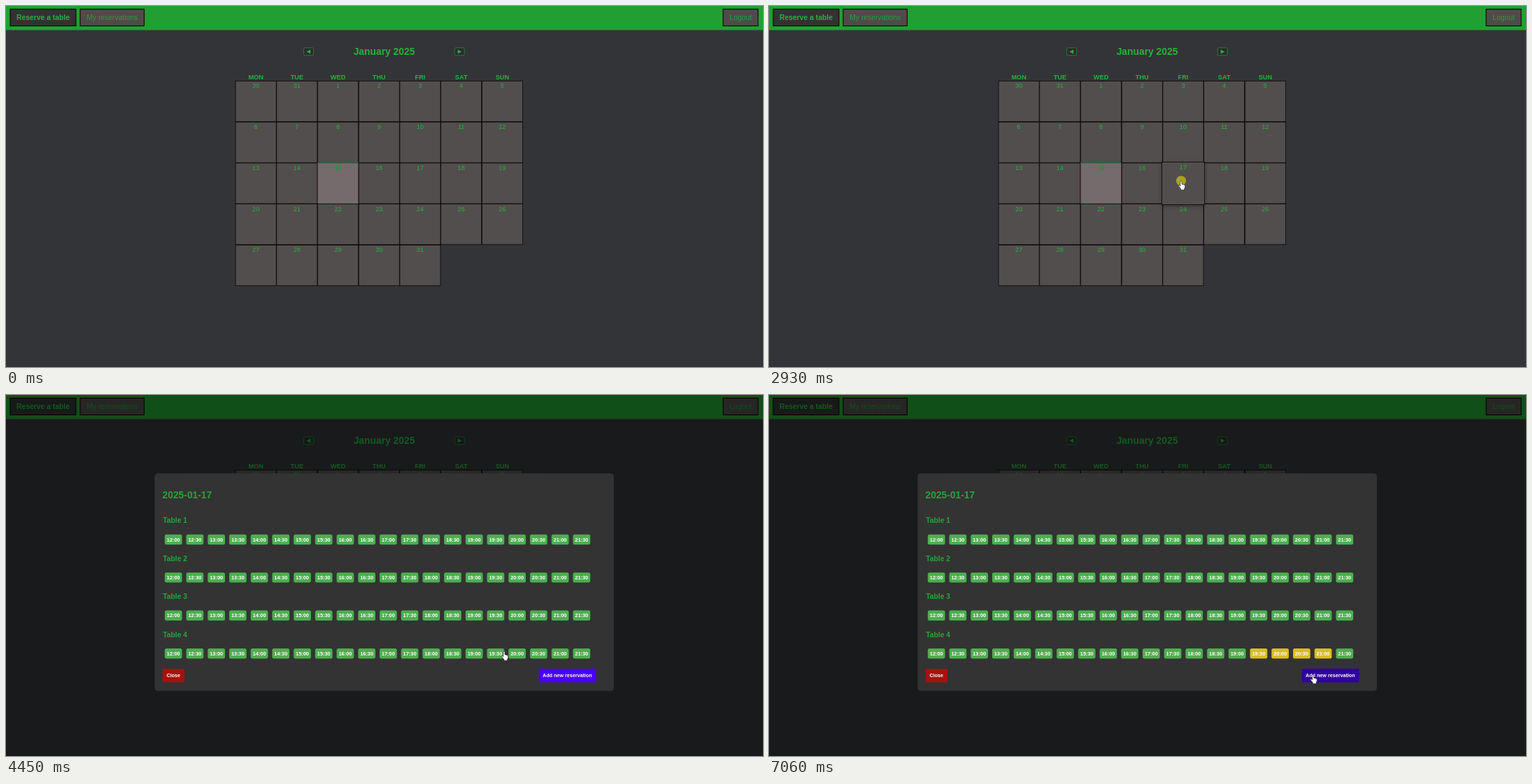
Animation of 1082 by 517 pixels, one loop 8000 ms. Source, as an HTML page:

```html
<!DOCTYPE html>
<html lang="en">
<head>
<meta charset="utf-8">
<title>Table reservations</title>
<style>
html, body { margin: 0; width: 100%; height: 100%; overflow: hidden; background: #333437; }
svg { display: block; width: 1082px; height: 517px; font-family: "Liberation Sans", Arial, sans-serif; }
text { text-anchor: middle; }
.bold { font-weight: bold; }
.start { text-anchor: start; }
</style>
</head>
<body>
<svg id="stage" viewBox="0 0 1082 517"></svg>
<script>
const LOOP = 8000;
const GREEN = '#28b13f';
const CELL = 58.7, LEFT = 327.8, TOP = 107.2;
const SLOT_X = 226.9, SLOT_STEP = 30.71, SLOT_W = 24.7, SLOT_H = 14.4, ROW_STEP = 54.4;
const MODAL_TOP = 112.2;

const range = n => [...Array(n).keys()];
const rect = (x, y, w, h, fill, more = '') =>
  `<rect x="${x}" y="${y}" width="${w}" height="${h}" fill="${fill}" ${more}/>`;
const text = (x, y, size, fill, str, cls = '') =>
  `<text x="${x}" y="${y}" font-size="${size}" fill="${fill}" class="${cls}">${str}</text>`;

const border = 'stroke="#0b0506" stroke-width="1.1"';
const navButton = (x, w, label, fill, color, cls) =>
  rect(x, 4.5, w, 24, fill, border) + text(x + w / 2, 20, 10.35, color, label, cls);

const arrowButton = (x, dir) =>
  rect(x, 59.8, 14, 11, '#2b2c2e', 'rx="2" stroke="#1f9136" stroke-width=".8"') +
  `<path d="M${x + 7 + 3 * dir} 65.6l${-5.6 * dir} -3v6z" fill="${GREEN}"/>`;

const cells = range(33).map(i => ({
  x: LEFT + i % 7 * CELL,
  y: TOP + Math.floor(i / 7) * CELL,
  day: (i + 29) % 31 + 1,
  today: i === 16
}));

function cellMarkup({ x, y, day, today }) {
  const edge = today
    ? `<path d="M${x} ${y + .3}h${CELL}M${x} ${y + CELL - .3}h${CELL}" stroke="#1f9a48" stroke-width=".9"/>`
    : '';
  const body = rect(x + .3, y + .3, CELL - .6, CELL - .6, today ? '#756b6c' : '#524e4d',
    `stroke="${today ? '#4a2c30' : '#050001'}" stroke-width=".7"`);
  const label = text(x + CELL / 2, y + 10.2, 9.2, today ? '#169a38' : GREEN, day, today ? 'bold' : '');
  return `<g class="cell">${body}${edge}${label}</g>`;
}

// Table rows, placed relative to the top of the open dialog
function tableMarkup(row) {
  const y = row * ROW_STEP;
  const slots = range(20).map(i => {
    const x = SLOT_X + i * SLOT_STEP;
    const time = 12 + (i >> 1) + (i % 2 ? ':30' : ':00');
    return rect(x, y + 87.6, SLOT_W, SLOT_H, '#4caf50', 'rx="2.5" class="slot"') +
      text(x + SLOT_W / 2, y + 97.5, 7.4, '#fff', time, 'bold');
  });
  return text(224.2, y + 71.3, 10.35, '#25a53a', 'Table ' + (row + 1), 'bold start') + slots.join('');
}

const stage = document.getElementById('stage');
stage.innerHTML =
  rect(0, 0, 1082, 517, '#333437') +
  rect(0, 0, 1082, 34.5, '#229f32') +
  navButton(6, 94, 'Reserve a table', '#333233', GREEN, 'bold') +
  navButton(106, 91.5, 'My reservations', '#504a4b', '#1fa338') +
  navButton(1025, 50, 'Logout', '#504a4b', '#1fa338') +
  arrowButton(425.6, -1) + arrowButton(641.2, 1) +
  text(540.5, 70.2, 13.85, GREEN, 'January 2025', 'bold') +
  ['MON', 'TUE', 'WED', 'THU', 'FRI', 'SAT', 'SUN'].map((d, i) =>
    text(LEFT + (i + .5) * CELL, 104.7, 9.2, GREEN, d, 'bold')).join('') +
  `<g id="grid">${cells.map(cellMarkup).join('')}</g>
  <g id="dialog">
    ${rect(0, 0, 1082, 517, '#000', 'opacity=".5"')}
    <g id="panel">
      ${rect(212.5, 0, 656.3, 93.5, '#333', 'rx="4.5" id="sheet"')}
      ${text(223.6, 35.6, 13.8, '#25a53a', '2025-01-17', 'bold start')}
      <g id="tables">${range(4).map(tableMarkup).join('')}</g>
      <g id="buttons">
        ${rect(223.7, 0, 31.3, 19.6, '#a81010', 'rx="1.2"')}
        ${text(239.3, 12.4, 7.2, '#fff', 'Close', 'bold')}
        ${rect(761.6, 0, 81.8, 19.6, '#4800ff', 'rx="1.2" id="add"')}
        ${text(802.3, 12.4, 7.2, '#fff', 'Add new reservation', 'bold')}
      </g>
    </g>
  </g>
  <circle id="click" r="7" fill="#bcb41a" opacity=".82"/>
  <g id="cursor" fill="#fff" stroke="#111" stroke-width=".6" stroke-linejoin="round">
    <path id="arrow" d="M0 0v9.2l2.1-1.9 1.5 3.4 1.5-.7-1.5-3.2h2.9z"/>
    <path id="hand" d="M-1.1 1.2a1.1 1.1 0 0 1 2.2 0v3.6l3.3.8q1.3.3 1.3 1.6v2.2l-1.1 2v1.8h-4.9v-1.6l-3.2-4q-.6-1.2.6-1.4l1.8 1.4z"/>
  </g>`;

const $ = id => document.getElementById(id);
const cellNodes = [...document.querySelectorAll('.cell')];
const lastRow = [...document.querySelectorAll('.slot')].slice(60);

// Pointer path: time, x, y
const path = [
  [390, 1031, 508], [1030, 845.5, 363], [1170, 827, 340], [2000, 625, 262],
  [2400, 589, 250.3], [3330, 589, 250.3], [4170, 725.5, 361], [4450, 712, 367],
  [4520, 711, 368], [4730, 711, 368], [4940, 726, 369], [5080, 726, 369],
  [5360, 757, 370], [5500, 757, 370], [5640, 784, 369.3], [5710, 793, 371],
  [5840, 786, 373], [6240, 786, 373], [6700, 750, 388], [7060, 777.5, 400.3]
];
const clicks = [2930, 4520, 4940, 5360, 5840];

function pointer(t) {
  const i = path.findIndex(p => p[0] > t);
  if (i < 0) return path[path.length - 1].slice(1);
  if (i === 0) return [-99, -99];
  const [t0, x0, y0] = path[i - 1], [t1, x1, y1] = path[i];
  const k = (t - t0) / (t1 - t0);
  return [x0 + (x1 - x0) * k, y0 + (y1 - y0) * k];
}

const inside = ([px, py], x, y, w, h) => px >= x && px < x + w && py >= y && py < y + h;
const overCell = (p, c) => inside(p, c.x, c.y, CELL, CELL);
const show = (node, on) => node.setAttribute('visibility', on ? 'visible' : 'hidden');

function drawGrid(t) {
  // Averaging the recent past gives each cell a linear 200 ms hover transition
  const trail = range(10).map(i => pointer(t - i * 20));
  cells.forEach((c, i) => {
    const lift = t < 3000 ? trail.filter(p => overCell(p, c)).length / 10 : 0;
    const node = cellNodes[i], cx = c.x + CELL / 2, cy = c.y + CELL / 2;
    node.setAttribute('transform', `translate(${cx} ${cy}) scale(${1 + .05 * lift}) translate(${-cx} ${-cy})`);
    node.style.filter = lift ? `drop-shadow(0 2.3px 2.3px rgba(0,0,0,${.35 * lift}))` : '';
    if (lift) $('grid').append(node);
  });
}

function draw(t) {
  const p = pointer(t), open = t >= 3000, full = t >= 3070;
  drawGrid(t);

  show($('dialog'), open);
  $('tables').style.display = full ? '' : 'none';
  $('panel').setAttribute('transform', `translate(0 ${full ? MODAL_TOP : 221.5})`);
  $('sheet').setAttribute('height', full ? 311.5 : 93.5);
  $('buttons').setAttribute('transform', `translate(0 ${full ? 279.7 : 62})`);

  const overAdd = full && inside(p, 761.6, 392, 81.8, 19.6);
  $('add').setAttribute('fill', overAdd ? '#3000a0' : '#4800ff');
  lastRow.forEach((slot, i) => {
    const picked = i > 14 && i < 19 && t >= clicks[i - 14] + 70;
    slot.setAttribute('fill', picked ? '#d8be22' : '#4caf50');
  });

  const overSlot = range(20).some(i =>
    inside(p, SLOT_X + i * SLOT_STEP, MODAL_TOP + 87.6 + 3 * ROW_STEP, SLOT_W, SLOT_H));
  const hand = open ? full && (overSlot || overAdd) : cells.some(c => overCell(p, c));
  show($('arrow'), !hand);
  show($('hand'), hand);
  $('cursor').setAttribute('transform', `translate(${p})`);
  show($('click'), clicks.some(c => t >= c && t < c + 140));
  $('click').setAttribute('transform', `translate(${p})`);
}

const start = performance.now();
function tick() {
  draw((performance.now() - start) % LOOP);
  requestAnimationFrame(tick);
}
tick();
</script>
</body>
</html>
```
